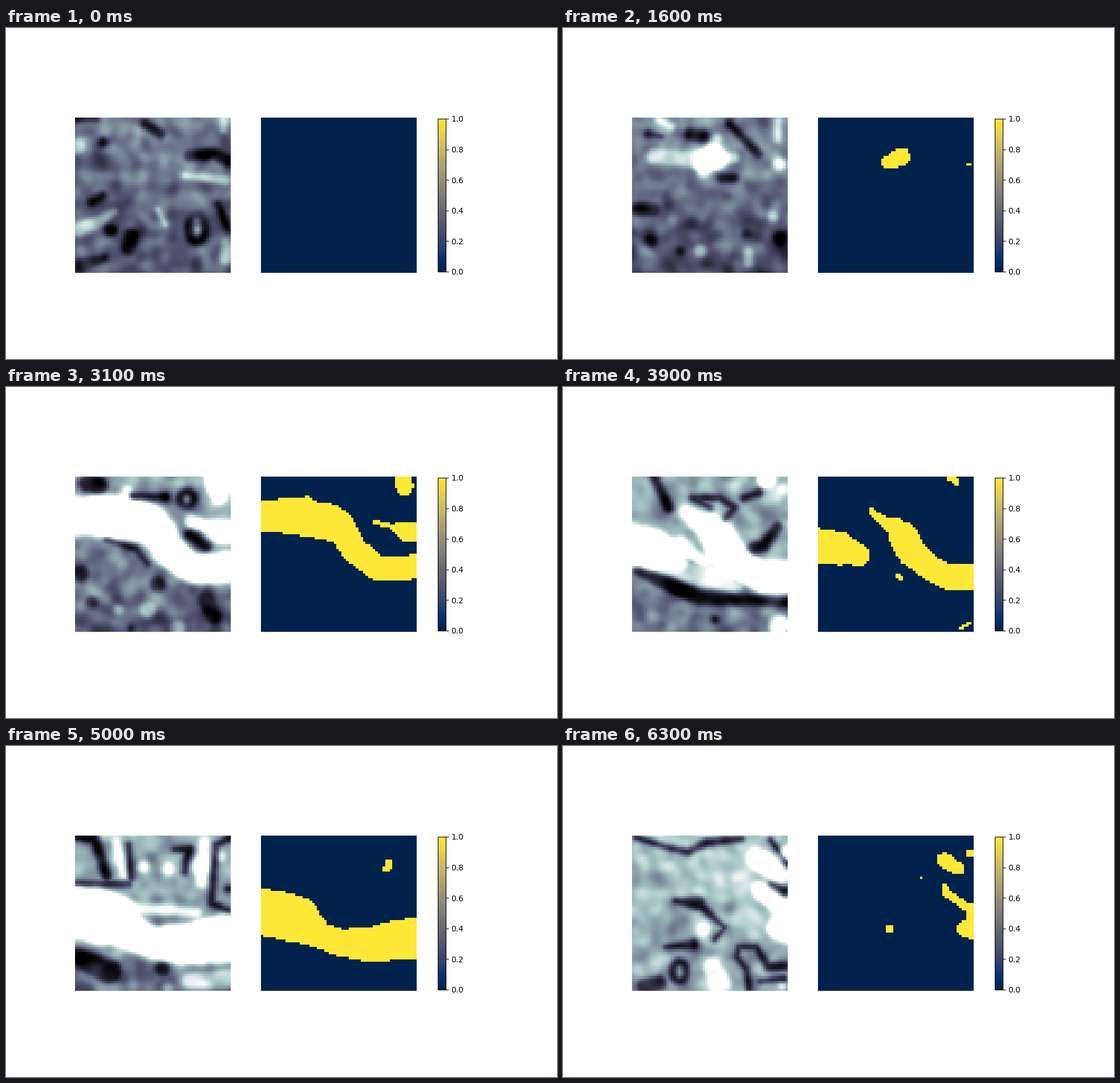
Animation of 966x580 px, one loop 6.4 s. Source, as a matplotlib script:

```python
import matplotlib.pyplot as plt
import numpy as np
from matplotlib.animation import FuncAnimation

plt.rcParams["font.family"] = "DejaVu Sans"

N = 64
STEP_MS = 100
REACH = 6
Y, X = np.mgrid[:N, :N] + 0.5


def tube(*points):
    """Distance inside a tapered tube through (x, y, radius) points, in cells."""
    p = np.array(points, float)
    field = np.full((N, N), -np.inf)
    for (x0, y0, r0), (x1, y1, r1) in zip(p, p[1:] if len(p) > 1 else p):
        dx, dy = x1 - x0, y1 - y0
        t = np.clip(((X - x0) * dx + (Y - y0) * dy) / max(dx * dx + dy * dy, 1e-9), 0, 1)
        gap = np.hypot(X - x0 - t * dx, Y - y0 - t * dy)
        field = np.maximum(field, r0 + t * (r1 - r0) - gap)
    return field


def ring(x, y, rx, ry, r):
    turn = np.linspace(0, 2 * np.pi, 17)
    return tube(*((x + rx * np.cos(a), y + ry * np.sin(a), r) for a in turn))


def union(fields):
    return np.maximum.reduce([np.full((N, N), -float(REACH)), *fields]).clip(max=REACH)


def soft(fields):
    return 1 / (1 + np.exp(-1.6 * union(fields)))


def smooth_noise(sigma, seed):
    """Unit-variance noise volume, correlated over sigma cells."""
    raw = np.random.default_rng(seed).standard_normal((N, N, N))
    f2 = np.fft.fftfreq(N) ** 2
    r2 = f2[:, None, None] + f2[:, None] + f2
    vol = np.fft.ifftn(np.fft.fftn(raw) * np.exp(-2 * np.pi ** 2 * sigma ** 2 * r2)).real
    return vol / vol.std()


class Slice:
    """A section: graded tissue with light and dark strands, crossed by vessels."""

    def __init__(self, index, top, bottom, light=(), dark=(), vessels=()):
        self.index = index
        base = top + (bottom - top) * Y / N
        self.tissue = (base + 0.4 * soft(light)) * (1 - 0.9 * soft(dark))
        self.field = union(vessels)


SLICES = [
    Slice(
        0, 0.5, 0.35,
        light=[tube((2, 46, 3), (8, 44, 2.5), (16, 39, 1.5)), tube((45, 24, 1), (62, 26, 2)),
               tube((62, 0, 2.5), (61, 5, 1.5)), tube((62, 52, 2), (62, 58, 2.5)),
               tube((50.5, 46.5, 1.5)), tube((1, 12, 3)), tube((34, 38, 1), (37, 44, 1))],
        dark=[tube((47, 16, 2.2), (57, 15, 2.2), (63, 18, 2.5)), tube((7, 35, 2), (11, 32, 1.5)),
              tube((0, 0.5, 1.5), (9, 0.5, 1)), tube((29, 3, 2), (35, 7, 2)), tube((11.5, 10.5, 2)),
              tube((14.5, 46.5, 2.5)), tube((22, 54, 3), (23, 49, 3)), ring(50, 46, 3.7, 5.5, 1.6),
              tube((3, 61, 3), (12, 58, 1.5)), tube((59, 36, 1.5), (63, 46, 1.5))]),
    Slice(
        16, 0.55, 0.33,
        light=[tube((9, 16, 3), (20, 17, 3), (31, 18, 4.5), (42, 17, 2)),
               tube((34.5, 9, 2), (30, 22, 3)), tube((60.5, 19.5, 2.5)),
               tube((11, 1, 1.5), (16, 4, 1.5)), tube((60, 2, 1.5), (60, 9, 1.5)),
               tube((58, 41, 2)), tube((28, 55, 2.5)), tube((48, 56, 2), (48, 60, 2))],
        dark=[tube((24, 7, 2.5), (29, 8, 2.5)), tube((37, 25, 2), (42, 25, 1.8)),
              tube((40, 3, 1.5), (52, 15, 1.8)), tube((7, 7, 1.8), (12, 8, 1)),
              tube((3, 38, 3), (9, 38, 2.5)), tube((47, 48, 2)), tube((61, 50, 3)),
              tube((8, 51, 2.5)), tube((20, 55, 1.8))],
        vessels=[tube((29, 18.7, 2.8), (34.3, 16.2, 3.6)), tube((61.5, 19.5, .6), (62.5, 19.5, .6))]),
    Slice(
        24, 0.65, 0.2,
        light=[tube((49, 0, 2), (61, 3, 4), (62, 9, 2)), tube((16.5, 6, 1.5)), tube((7, 2, 2)),
               tube((48, 38.5, 2), (63, 37, 2.3)), tube((63, 48, 1.8)), tube((27, 47, 2)),
               tube((20, 33, 2)), tube((51, 59, 2.2)), tube((17, 58, 2))],
        dark=[tube((23, 6.5, 1.8), (31, 6.5, 1.8)), ring(42, 7.5, 4.3, 3.2, 1.2),
              tube((45, 27, 2), (54, 31, 3)), tube((57, 13.5, 1.2), (60, 13.5, 1.2)),
              tube((0, 5, 2)), tube((2, 39, 3.5)), tube((33, 40, 2.8)), tube((6, 51, 3)),
              tube((34, 54, 2.5))],
        vessels=[tube((-3, 16, 6.5), (8, 16.2, 7.5), (16, 16, 8.8), (26, 18, 7.4), (38, 17.2, 6),
                      (45, 18.8, 4.8), (56, 22, 4.8), (67, 20.5, 5)),
                 tube((30, 20, 6), (35, 28, 4.4), (40.5, 33, 2.4)),
                 tube((51.5, 0, 2.5), (53, 2.5, 1.4))]),
    Slice(
        31, 0.65, 0.35,
        light=[tube((58, 0, 4), (59, 9, 3)), tube((22, 6, 1.8)), tube((48, 18.5, 2), (56, 21, 2)),
               tube((30, 55, 3.2)), tube((42, 62.5, 3)), tube((18, 55, 2))],
        dark=[tube((5, 3, 3.5), (10, 4, 3.5)), tube((24, 8.5, 1.6), (37, 8.5, 1.8)),
              ring(46, 9.5, 2.8, 3, 1.6), tube((47, 24, 2), (54, 29, 2.2)), tube((2, 40, 3.5)),
              tube((34, 44.5, 3.2)), tube((13, 26, 1), (25, 30, 1.5), (30, 36, 1)),
              tube((54, 51, 3.5), (57, 58, 3)), tube((23, 63, 1.5)), tube((7, 52, 2.5))],
        vessels=[tube((-3, 16.3, 6.3), (14, 16.5, 7.4), (28, 19, 7.6), (32, 20, 6.2),
                      (38.3, 30.2, 5.3), (48, 38, 5.1), (67, 37.3, 5)),
                 tube((19, 10, 2)), tube((58.5, 0, 3.7), (59, 4.3, 3.6)),
                 tube((47, 19, 1), (53, 20.5, 1), (60, 23, 4), (67, 23.3, 4))]),
    Slice(
        39, 0.68, 0.5,
        light=[tube((8, 36, 3), (28, 41, 4.5), (42, 46, 2)), tube((60, 61, 4)), tube((54, 2, 2.5)),
               tube((20, 27, 2.5), (31, 38, 2.5), (44, 46, 1)), tube((62, 5, 2))],
        dark=[tube((9, 0, 1.8), (15, 13, 2)), tube((46, 9, 1.5), (52, 7, 1.8)),
              tube((32, 13, 1.2), (25, 9, 1.3), (36, 9, 1.3), (42, 13, 1.5), (38, 18, 1.3)),
              tube((50, 30, 2.8), (54, 29, 2.5), (60, 21, 2)),
              tube((2, 39, 1.5), (14, 44, 3), (28, 50, 3), (64, 52, 2)), tube((34, 59, 1.5))],
        vessels=[tube((-3, 28, 7), (9, 29.8, 6.8), (17, 32.5, 4.3)),
                 tube((22, 14.3, 1.4), (26, 18, 1.8), (32, 21, 4), (35.3, 25, 6), (38.3, 31, 5.9),
                      (46, 37.8, 4.9), (54, 41.7, 5.2), (67, 41.5, 5.5)),
                 tube((33, 41, 1.1), (34, 42, 1.1)), tube((54.5, 0, 1.8), (57, 2.7, 1.4)),
                 tube((59, 62.3, .8), (62, 60.6, .8))]),
    Slice(
        50, 0.72, 0.45,
        light=[tube((17, 3, 1.5), (20, 16, 1.5)), tube((28, 13, 2.5)), tube((38, 14, 2.5)),
               tube((53, 3, 2), (52, 19, 2.5)), tube((60, 9, 2)), tube((47, 60, 3), (64, 59, 4)),
               tube((38, 63, 2)), tube((24, 30, 2), (50, 32, 2))],
        dark=[tube((0, 0, 2), (8, 1, 2), (13, 17, 2)), tube((22, 4, 1.2), (23, 18, 1.2)),
              tube((0, 20, 1), (22, 20, 1.5)), tube((41, 6, 1), (47, 6, 1.8), (45, 15, 1.5)),
              tube((64, 1, 1.5), (58, 4, 1.3), (56, 28, 1.5), (63, 31, 1)), tube((63, 22, 1.2)),
              tube((0, 50, 4), (14, 56, 5)), tube((36, 55, 3))],
        vessels=[tube((-3, 31, 9.5), (8, 33, 9.8), (14.8, 34.8, 9.6), (25, 41.5, 5.3),
                      (33, 44.3, 5.6), (46, 45, 7.3), (56, 43, 8.2), (67, 42.5, 8.6)),
                 tube((52.5, 11.5, 1.7), (51.8, 14, 1.5))]),
    Slice(
        63, 0.78, 0.62,
        light=[tube((50, 7, 1.5), (62, 17, 3)), tube((60, 38, 3.5)), tube((33, 54, 3.5), (36, 61, 4.5)),
               tube((57, 26, 1.5), (62, 29, 2)), tube((62, 62, 1.5))],
        dark=[tube((2, 1, 1.2), (14, 5, 1.2), (23, 7, 1.4), (31, 3, 1.8), (45, 1.5, 1.3)),
              tube((57, 2, 1), (64, 12, .8)), tube((57, 20, .8), (63, 23, 1.8)),
              tube((18, 27, 1), (27, 28, 3)), tube((27, 28, 2), (38, 38, .8), (34, 43, .8)),
              tube((14, 46, .6), (25, 45, 2.2)), ring(19.5, 56, 3, 4, 1.5),
              tube((5, 62, 3), (11, 61, 3)), tube((53, 60, 1), (62, 59, 1.4)),
              tube((64, 54, 1.8), (56, 54, 1.8), (51, 46, 1), (44, 46, 1), (43, 50, 1),
                   (47, 55, 1.3), (48, 63, 1.1))],
        vessels=[tube((52, 10.3, 3.1), (58, 14, 2.5)), tube((62.5, 7.5, 2)), tube((42.5, 17.5, .5)),
                 tube((52, 21, 1.2), (53, 24, 1.6), (61, 29.5, 1.8), (65, 31, 2)),
                 tube((61, 38.5, 3.8), (64, 39, 3.8)), tube((63, 30, 1.5), (62, 38, 1.5)),
                 tube((29.7, 38.5, 1.7))]),
]
GRAIN = smooth_noise(1.9, 4)

# Blur that spreads the vessels' glow, normalised at the borders
BLUR = np.exp(-((X - X.T[:, :1].T - 0) ** 2) / 8) if False else np.exp(-(X - Y) ** 2 / 6)
BLUR /= BLUR.sum(1, keepdims=True)


def section(i):
    """Scan and vessel mask at depth i."""
    k = max(n for n, s in enumerate(SLICES[:-1]) if s.index <= i)
    a, b = SLICES[k], SLICES[k + 1]
    t = (i - a.index) / (b.index - a.index)
    tissue = (1 - t) * a.tissue + t * b.tissue + 0.07 * GRAIN[i]
    mask = ((1 - t) * a.field + t * b.field > 0).astype(float)
    glow = BLUR @ mask @ BLUR.T
    return np.clip(tissue + 1.5 * glow, 0, 1), mask


fig, axes = plt.subplots(1, 2, figsize=(9.66, 5.8), dpi=100)
blank = np.zeros((N, N))
scan_im = axes[0].imshow(blank, cmap="bone", vmin=0, vmax=1, interpolation="nearest")
mask_im = axes[1].imshow(blank, cmap="cividis", vmin=0, vmax=1, interpolation="nearest")
for ax in axes:
    ax.axis("off")
fig.colorbar(mask_im, ax=axes, shrink=0.6)


def update(i):
    scan, mask = section(i)
    scan_im.set_data(scan)
    mask_im.set_data(mask)
    return scan_im, mask_im


anim = FuncAnimation(fig, update, frames=N, interval=STEP_MS, repeat=True, repeat_delay=0)
plt.show()
```
